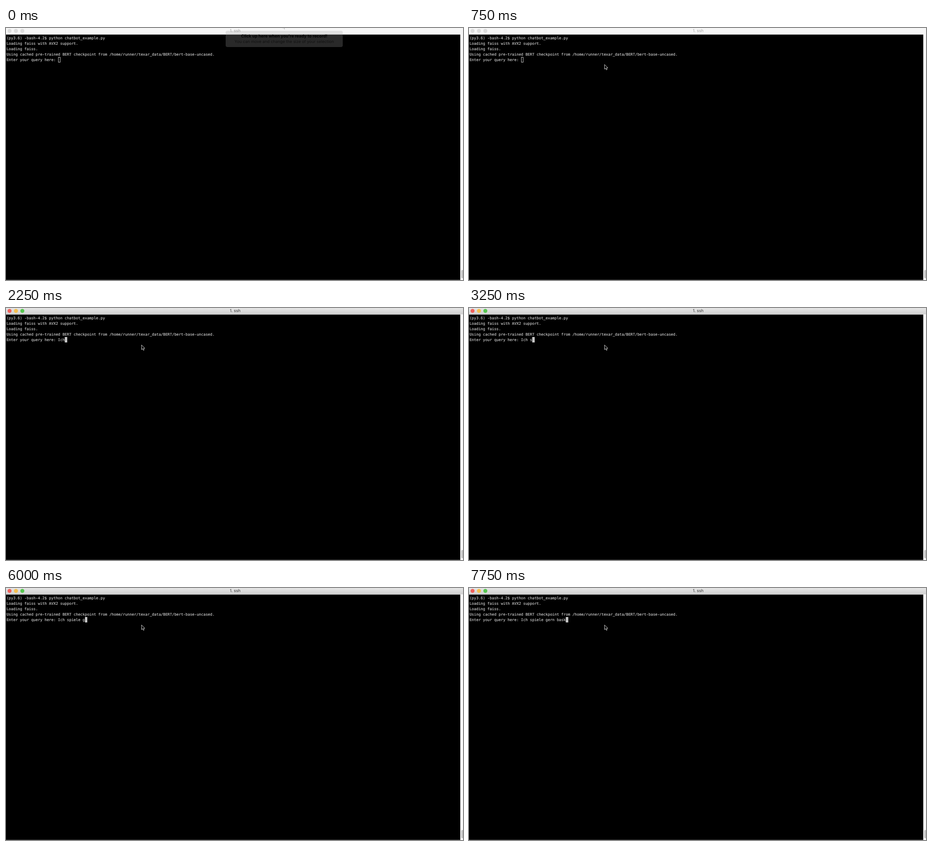
An HTML page for the animation above (8000 ms loop, 1007x556 px).

```html
<!DOCTYPE html>
<html lang="en">
<head>
<meta charset="utf-8">
<title>Terminal session</title>
<style>
  html, body { margin: 0; width: 100%; height: 100%; overflow: hidden; background: #000; }
  #stage { position: relative; width: 1007px; height: 556px; overflow: hidden; background: #000;
    text-rendering: geometricPrecision; }
  #stage > * { position: absolute; }
  #bar { left: 0; top: 0; width: 1007px; height: 14px; background: #f6f6f6; color: #a4a4a4;
    border-bottom: 1px solid #808080; font: 9px/13px Inter, Roboto, sans-serif; }
  #bar.active { background: linear-gradient(#e5e5e5, #d0d0d0); color: #303030; }
  #bar span { position: absolute; left: 405px; width: 200px; text-align: center; }
  #bar svg { position: absolute; left: 0; top: 0; }
  #bar circle { fill: #dcdcdc; }
  #bar.active circle { fill: var(--c); }
  #term { left: 1.2px; top: 16px; margin: 0; color: #d0d0d0; -webkit-text-stroke: .15px #d0d0d0;
    font: 8.2px/12px "DejaVu Sans Mono", monospace; }
  #caret { left: 0; top: 64px; width: 4.7px; height: 12px; box-sizing: border-box;
    border: 1px solid #c7c7c7; }
  #caret.solid { background: #c7c7c7; }
  #track { left: 1001px; top: 14px; width: 6px; height: 542px; background: #fafafa; }
  #thumb { left: 1003px; top: 534px; width: 4px; height: 18px; border-radius: 2px 0 0 2px; background: #c1c1c1; }
  #base { left: 0; top: 555px; width: 1001px; height: 1px; background: #3a3a3a; }
  #hint { left: 484px; top: 6px; width: 258px; height: 36px; border-radius: 4px;
    background: rgba(160, 160, 160, .26); color: #111; text-align: center;
    font: 8.9px/12px Inter, Roboto, sans-serif; white-space: nowrap; }
  #hint div { position: absolute; width: 100%; top: 19px; }
  #hint .head { top: 7px; font-size: 9.2px; font-weight: 700; color: #000; }
  #mouse { left: 0; top: 0; }
</style>
</head>
<body>
<div id="stage">
  <div id="bar">
    <svg width="50" height="14">
      <circle cx="7.8" cy="6.3" r="4.4" style="--c:#f0625c"/>
      <circle cx="21.9" cy="6.3" r="4.4" style="--c:#f5bf4f"/>
      <circle cx="36" cy="6.3" r="4.4" style="--c:#57c650"/>
    </svg>
    <span>1. ssh</span>
  </div>
  <pre id="term"></pre>
  <div id="caret"></div>
  <div id="track"></div>
  <div id="thumb"></div>
  <div id="base"></div>
  <svg id="mouse" width="10" height="15" viewBox="0 0 10 15">
    <path d="M.7 .6V10.8L3 8.7 4.6 12.4 6.4 11.6 4.8 8H8Z" fill="#000" stroke="#e8e8e8" stroke-width=".9" stroke-linejoin="round"/>
  </svg>
  <div id="hint">
    <div class="head">Click up here when you're ready to record!</div>
    <div>You can move and change the size of your selection</div>
  </div>
</div>
<script>
const LOOP = 8000, CHAR = 4.93, CARET_X = 114.9;
const QUERY = "Ich spiele gern bask";
const INTRO = [
  "(py3.6) -bash-4.2$ python chatbot_example.py",
  "Loading faiss with AVX2 support.",
  "Loading faiss.",
  "Using cached pre-trained BERT checkpoint from /home/runner/texar_data/BERT/bert-base-uncased.",
  "Enter your query here: "
].join("\n");

// [start ms, characters typed]
const TYPING = [[0, 0], [2000, 1], [2250, 3], [2500, 4], [3250, 5], [3750, 6], [4250, 8],
  [4500, 10], [4750, 11], [6000, 12], [6250, 14], [6500, 16], [7250, 18], [7500, 19], [7750, 20]];
// [start ms, x, y, opacity]
const POINTER = [[0, 608.5, -9, .3], [500, 298, 79, 1], [750, 298, 80, 1], [1000, 298, 81, 1]];

const el = id => document.getElementById(id);
const bar = el("bar"), term = el("term"), caret = el("caret"), hint = el("hint"), mouse = el("mouse");
const at = (steps, t) => steps.findLast(step => step[0] <= t);

function draw(t) {
  const active = t >= 1000;
  const typed = at(TYPING, t)[1];
  const [, x, y, opacity] = at(POINTER, t);
  bar.classList.toggle("active", active);
  caret.classList.toggle("solid", active);
  hint.style.display = t < 250 ? "" : "none";
  term.textContent = INTRO + QUERY.slice(0, typed);
  caret.style.transform = `translateX(${CARET_X + typed * CHAR}px)`;
  mouse.style.transform = `translate(${x}px, ${y}px)`;
  mouse.style.opacity = opacity;
}

const start = performance.now();
function tick() {
  draw((performance.now() - start) % LOOP);
  requestAnimationFrame(tick);
}
tick();
</script>
</body>
</html>
```
